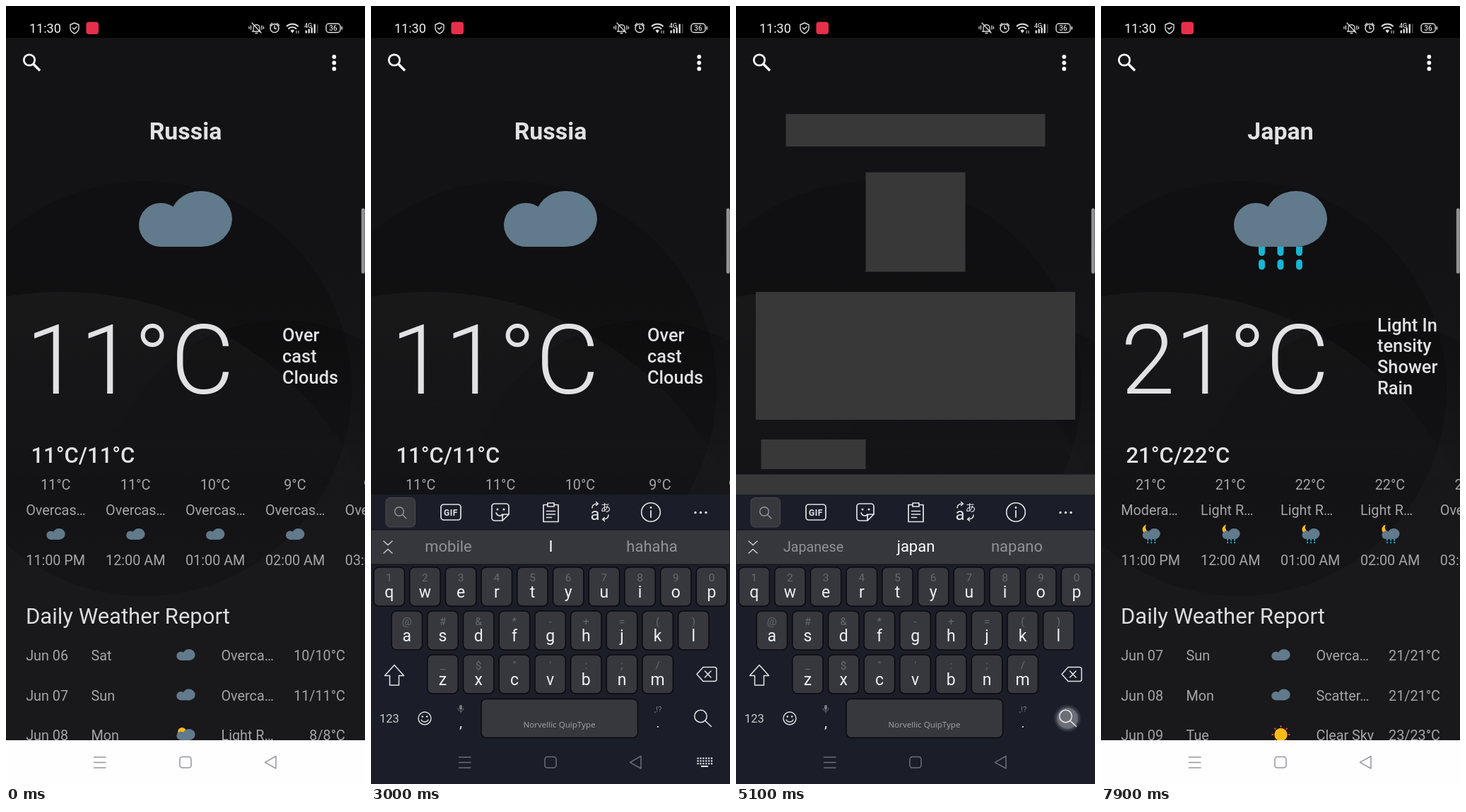
Write an HTML page that moves like this. It is 508x1102 px and loops after 8000 ms.

```html
<!DOCTYPE html>
<html lang="en">
<head>
<meta charset="utf-8">
<title>Weather search</title>
<style>
html, body { margin: 0; width: 100%; height: 100%; overflow: hidden; background: #131214; }
svg { display: block; width: 508px; height: 1102px; font-family: Roboto, sans-serif; }
.line { fill: none; stroke-linecap: round; stroke-linejoin: round; }
</style>
</head>
<body>
<svg id="stage" viewBox="0 0 508 1102" xmlns="http://www.w3.org/2000/svg"></svg>
<script>
const LOOP = 8000, STEP = 100;
const SLATE = '#617a8c', CYAN = '#16b6d4', AMBER = '#fdbb17';
const WHITE = '#e2e1e3', GREY = '#a5a4a7', KEY = '#37373e', BOARD = '#1b1e28';

// ---- markup helpers ----
const text = (x, y, size, fill, str, more = '') =>
  `<text x="${x}" y="${y}" font-size="${size}" fill="${fill}" ${more}>${str}</text>`;
const mid = (x, y, size, fill, str, more = '') =>
  text(x, y, size, fill, str, 'text-anchor="middle" ' + more);
const rect = (x, y, w, h, fill, r = 0, more = '') =>
  `<rect x="${x}" y="${y}" width="${w}" height="${h}" rx="${r}" fill="${fill}" ${more}/>`;
const dot = (x, y, r, fill, more = '') =>
  `<circle cx="${x}" cy="${y}" r="${r}" fill="${fill}" ${more}/>`;
const line = (d, stroke, w) =>
  `<path class="line" d="${d}" stroke="${stroke}" stroke-width="${w}"/>`;
const group = (id, body, more = '') => `<g id="${id}" ${more}>${body}</g>`;
const place = (x, y, s, body) => `<g transform="translate(${x} ${y}) scale(${s})">${body}</g>`;

// ---- weather icons, drawn around 0,0 at full size ----
const cloud = dot(-35, 8.5, 31, SLATE) + rect(-35, 8.5, 57, 31, SLATE) +
  `<ellipse cx="22" rx="44" ry="39.5" fill="${SLATE}"/>`;
const drops = [-26.5, 0, 26.5].map(x =>
  `<path d="M${x - 4.5} 39h9v9a4.5 4.5 0 0 1-9 0z" fill="${CYAN}"/>` +
  rect(x - 4.5, 57.5, 9, 14.5, CYAN, 4.5)).join('');
const rays = [...Array(8)].map((_, i) =>
  `<path d="M0-52V-64" stroke="#ef5030" stroke-width="9" transform="rotate(${i * 45})"/>`).join('');
const icons = {
  cloud,
  rain: drops + cloud,
  sunCloud: dot(-27, -20, 30, AMBER) + cloud,
  moonRain: place(0, -8, 1,
    `<path d="M-32-58A34 34 0 1 0 2-4A36 36 0 0 1-32-58z" fill="${AMBER}"/>` +
    place(4, 6, 0.95, drops + cloud)),
  sun: rays + dot(0, 0, 46, AMBER)
};

// ---- app content ----
function weather(id, w) {
  const hours = w.hours.map(([temp, sky], i) => {
    const x = 28.2 + 112.9 * i, c = x + 42;
    const time = ['11:00 PM', '12:00 AM', '01:00 AM', '02:00 AM', '03:00 AM'][i];
    return mid(c, 685, 19.8, GREY, temp + '°C') + text(x, 720.5, 19.8, GREY, sky) +
      text(x, 792, 19.8, GREY, time);
  }).join('');
  const days = w.days.map(([date, day, , sky, range], i) => {
    const y = 927 + 56.5 * i;
    return text(28.2, y, 19.8, GREY, date) + text(120.5, y, 19.8, GREY, day) +
      text(304.5, y, 19.8, GREY, sky) + text(480, y, 19.8, GREY, range + '°C', 'text-anchor="end"');
  }).join('');
  const skyTop = 505 - (w.sky.length - 1) * 14.8;
  const art = place(254, 301.5, 1, icons[w.icon]) +
    w.hours.map((_, i) => place(70.5 + 112.9 * i, 748, 0.2, icons[w.hourIcon])).join('') +
    w.days.map((d, i) => place(254.5, 919 + 56.5 * i, 0.2, icons[d[2]])).join('');
  return group(id,
    mid(254, 189, 33.9, WHITE, w.city, 'font-weight="700"') +
    text(28, 549, 138, WHITE, w.now, 'font-weight="300"') +
    w.sky.map((s, i) => text(391, skyTop + i * 29.7, 25.4, WHITE, s, 'font-weight="500"')).join('') +
    text(35.5, 647, 31, WHITE, w.range, 'font-weight="500"') +
    hours + text(28, 874.5, 31, '#dcdbdd', 'Daily Weather Report') + days +
    group(id + 'Art', art), 'clip-path="url(#page)"');
}

const first = weather('first', {
  city: 'Russia', icon: 'cloud', now: '11°C', range: '11°C/11°C', hourIcon: 'cloud',
  sky: ['Over', 'cast', 'Clouds'],
  hours: [11, 11, 10, 9, 9].map(t => [t, 'Overcas…']),
  days: [['Jun 06', 'Sat', 'cloud', 'Overca…', '10/10'],
         ['Jun 07', 'Sun', 'cloud', 'Overca…', '11/11'],
         ['Jun 08', 'Mon', 'sunCloud', 'Light R…', '8/8']]
});
const second = weather('second', {
  city: 'Japan', icon: 'rain', now: '21°C', range: '21°C/22°C', hourIcon: 'moonRain',
  sky: ['Light In', 'tensity', 'Shower', 'Rain'],
  hours: [[21, 'Modera…'], [21, 'Light R…'], [22, 'Light R…'], [22, 'Light R…'], [22, 'Overcas…']],
  days: [['Jun 07', 'Sun', 'cloud', 'Overca…', '21/21'],
         ['Jun 08', 'Mon', 'cloud', 'Scatter…', '21/21'],
         ['Jun 09', 'Tue', 'sun', 'Clear Sky', '23/23']]
});
const skeleton = group('skeleton', [
  [70.5, 153, 367, 46], [183.5, 235.5, 141, 141], [28, 405, 452, 181], [35.5, 614, 148, 42],
  [0, 663.5, 508, 141.5], [28, 841.5, 289.5, 41.5], [28, 891.5, 452, 149]
].map(r => rect(...r, '#393839')).join(''));

const defs = `<defs>
  <clipPath id="page"><rect y="45" width="508" height="995"/></clipPath>
  <linearGradient id="base" x2="0" y2="1"><stop offset=".3" stop-color="#131214"/><stop offset=".75" stop-color="#19181b"/></linearGradient>
  <linearGradient id="hill" x2="0" y2="1"><stop stop-color="#fff" stop-opacity=".035"/><stop offset=".3" stop-color="#fff" stop-opacity="0"/></linearGradient>
  <linearGradient id="dusk" x2="0" y2="1"><stop stop-color="#000" stop-opacity=".2"/><stop offset=".4" stop-color="#000" stop-opacity="0"/></linearGradient>
  <radialGradient id="glow"><stop offset=".7" stop-color="#f2f2f6"/><stop offset=".78" stop-color="#c8cede" stop-opacity=".55"/><stop offset="1" stop-color="#c8cede" stop-opacity="0"/></radialGradient>
</defs>`;
const backdrop = rect(0, 0, 508, 1102, 'url(#base)') + dot(195, 542, 294, '#000', 'opacity=".17"') +
  dot(390, 690, 245, 'url(#dusk)') + dot(80, 874, 469, 'url(#hill)');

// ---- status bar and header ----
const S = '#dedede';
const statusBar = rect(0, 0, 508, 45, '#000') + text(33, 37.5, 18, '#f2f2f2', '11:30') +
  line('M97 24l6 2.5v5c0 4-3 6-6 7.5c-3-1.5-6-3.5-6-7.5v-5zM94.5 31l2 2 3.5-3.5', S, 1.4) +
  rect(113.5, 22.5, 17.5, 17.5, '#e6304b', 4) +
  line('M348.5 36h11.5M350 36v-5a4.5 4.5 0 0 1 9 0v5M353 38.5h3M348 24l13 14M346.5 28v5M344 29.5v2.5M362 28v5M364.5 29.5v2.5', S, 1.3) +
  dot(380, 31.5, 6, 'none', `stroke="${S}" stroke-width="1.5"`) +
  line('M380 28v4h2.5M373.5 27.5l3-3M386.5 27.5l-3-3', S, 1.4) +
  line('M397.5 28.5a11.5 11.5 0 0 1 15.5 0M400 32a7.5 7.5 0 0 1 10.5 0', S, 1.9) +
  `<path d="M402.5 34.8a4 4 0 0 1 5.5 0L405.2 38.5z" fill="${S}"/>` +
  line('M411 35v3.5M414 35v3.5', S, 1) +
  text(422, 31, 9, S, '4G', 'font-weight="500"') +
  [[423.5, 4], [427.5, 6], [431.5, 8], [435.5, 13]].map(([x, h]) => rect(x, 38.5 - h, 2.4, h, S)).join('') +
  rect(440, 25.5, 1.6, 13, '#444') +
  rect(453, 25, 20, 12.5, 'none', 4, `stroke="${S}" stroke-width="1.4"`) +
  rect(474.5, 29, 1.6, 4.5, S) + mid(463, 35, 10, S, '36', 'font-weight="500"');
const header = dot(33, 76.5, 7.7, 'none', 'stroke="#f6f6f6" stroke-width="2.8"') +
  `<path d="M38.5 82L48 91.5" stroke="#f6f6f6" stroke-width="3.6"/>` +
  [72, 80.5, 89].map(y => dot(464.3, y, 2.9, '#f6f6f6')).join('');
const field = group('clear', line('M379.5 71.5l15 15M394.5 71.5l-15 15', '#030303', 2)) +
  text(105, 88, 25.4, '#ececee', '', 'id="typed"') +
  rect(105, 91, 0, 1.6, '#dcdcde', 0, 'id="under"') + rect(105.3, 61.5, 2.4, 34, '#fff', 0, 'id="cursor"');

// ---- keyboard ----
const rows = [
  { keys: 'qwertyuiop', hints: '1234567890', x: 25.7, y: 795 },
  { keys: 'asdfghjkl', hints: '@#&*-+=()', x: 50.8, y: 857 },
  { keys: 'zxcvbnm', hints: '_$"\':;/', x: 101.5, y: 919 }
];
const spot = {};
const esc = c => c === '&' ? '&amp;' : c;
const cap = (x, y, w, h) => rect(x, y, w, h, KEY, 7, 'stroke="#0a0a0e" stroke-width="1.5"');
const keys = rows.map(r => [...r.keys].map((k, i) => {
  const x = r.x + 50.7 * i;
  spot[k] = [x, r.y];
  return cap(x - 21.7, r.y, 43.4, 55) + mid(x, r.y + 20, 15.5, '#68686e', esc(r.hints[i])) +
    mid(x, r.y + 43, 23, '#f0f0f3', k);
}).join('')).join('');

const I = '#e4e4e8';
const toolbar = rect(21, 696.5, 41.5, 41.5, KEY, 6, 'stroke="#4a4a50"') +
  dot(40, 716, 6.3, 'none', 'stroke="#97979c" stroke-width="1.4"') + line('M44.8 720.8l5 5', '#97979c', 1.4) +
  rect(99, 706, 28, 22, 'none', 4, `stroke="${I}" stroke-width="1.7"`) +
  mid(113, 721.5, 12, I, 'GIF', 'font-weight="700" letter-spacing=".6"') +
  line('M175 705h16a4 4 0 0 1 4 4v11l-9 9h-11a4 4 0 0 1-4-4v-16a4 4 0 0 1 4-4zM195 720h-6a3 3 0 0 0-3 3v6M177 718c2 5 7 5 9 2', I, 1.7) +
  dot(179, 713, 1.5, I) + dot(188, 713, 1.5, I) +
  line('M250 706.5h-6v24h21v-24h-6M250 704h9v5h-9zM248.5 715.5h12M248.5 720h12M248.5 724.5h7', I, 1.7) +
  mid(317, 728, 24, I, 'a') + mid(332, 716, 15, I, 'あ', 'font-family="Noto Sans CJK JP, sans-serif"') +
  line('M313 711c0-4 3-6 8-6M318.5 702.5l3 2.5-3 2.5M336 721c0 4-3 6-8 6M330.500 724.500l-3 2.500 3 2.500', I, 1.5) +
  dot(396, 717, 13.3, 'none', `stroke="${I}" stroke-width="1.6"`) + line('M396 715v9', I, 1.8) + dot(396, 710.5, 1.4, I) +
  [459, 466.5, 474].map(x => dot(x, 717.5, 1.7, I)).join('');
const strip = rect(0, 742, 508, 49, '#36363d', 0, 'stroke="#101116"') +
  line('M18 758l6 5.500 6-5.500M18 775l6-5.500 6 5.500', '#c9c9ce', 1.5) +
  mid(109.500, 773, 22, '#919197', '', 'id="left"') + mid(254.500, 773, 22, '#fff', '', 'id="centre"') +
  mid(397.500, 773, 22, '#919197', '', 'id="right"');
const bottomRow = cap(156, 981.5, 221.5, 55) +
  mid(266.5, 1021.5, 11.6, '#a4a4aa', 'Norvellic QuipType', 'font-family="Open Sans, sans-serif"') +
  text(12, 1015, 16.5, '#c9c9ce', '123') +
  dot(76, 1009, 9, 'none', `stroke="${I}" stroke-width="1.4"`) +
  dot(72.8, 1006.5, 1.3, I) + dot(79.2, 1006.5, 1.3, I) + line('M71 1011c2 4 8 4 10 0', I, 1.3) +
  rect(125, 990, 4, 7, '#77777d', 2) + line('M123 995c0 5 8 5 8 0M127 999v2', '#77777d', 1) +
  mid(127, 1022, 21, I, ',') + mid(406, 1000, 11.5, '#77777d', ',!?') + mid(406, 1022, 19, I, '.') +
  dot(466.5, 1006, 8.7, 'none', `stroke="${I}" stroke-width="1.5"`) + line('M473 1012.500l8.500 8', I, 1.5) +
  line('M33 933.500l13.500 15h-7v13.500h-13v-13.500h-7z', I, 1.5) +
  line('M470 936.500h16a3 3 0 0 1 3 3v14a3 3 0 0 1-3 3h-16l-9-10zM472.500 942l8.500 9M481 942l-8.500 9', I, 1.5);
const popup = group('popup', rect(-24.5, -65, 49, 124, KEY, 7, 'stroke="#0a0a0e" stroke-width="1.5"') +
  mid(0, -22, 34, '#fff', '', 'id="popKey"'));
const board = group('board', rect(0, 692, 508, 410, BOARD) + toolbar + strip + keys + bottomRow + popup);

const navIcons = group('nav', line('M124.500 1064h16.500M124.500 1071.500h16.500M124.500 1079h16.500', 'currentColor', 1.5) +
  rect(246, 1063.500, 16, 15.500, 'none', 3.5, 'stroke="currentColor" stroke-width="1.5"') +
  line('M382 1062.500v17.500l-15.500-8.700z', 'currentColor', 1.5));
const pad = group('pad', [0, 1, 2].map(r => [...Array(6)].map((_, i) =>
  rect(461.5 + i * 3.9, 1064.5 + r * 3.8, 2.2, 2.2, 'currentColor')).join('')).join('') +
  rect(467, 1076, 10, 2, 'currentColor'));

const stage = document.getElementById('stage');
stage.innerHTML = defs + backdrop + first + second + skeleton + statusBar + header + field +
  rect(502.8, 286.5, 5, 92.5, '#929193', 2.5) + rect(0, 1040, 508, 62, '#fefdff') +
  board + navIcons + pad + dot(0, 0, 20, 'url(#glow)', 'id="touch"');

// ---- timeline: [from ms, values...] ----
const boardSteps = [[0, 0, 0], [2600, 105, 0.5], [2700, 45, 0.8], [2800, 14, 0.95], [2900, 2, 1], [3000, 0, 1],
  [5200, 80, 0.5], [5300, 0, 0]];
const touchSteps = [[0, 0, 0, 0], [2500, 35.5, 81, 0.5], [2600, 35.5, 81, 0.42], [2700, 35.5, 81, 0.15], [2800, 0, 0, 0],
  [3700, 357, 900, 0.7], [3800, 357, 900, 0.35], [3900, 52, 902, 0.7], [4000, 483, 840, 0.7],
  [4100, 483, 840, 0.35], [4200, 52, 901, 0.7], [4300, 52, 901, 0.35], [4400, 358, 964, 0.76],
  [4500, 358, 964, 0.5], [4600, 358, 964, 0.2], [4700, 0, 0, 0],
  [5000, 469, 1009, 0.6], [5100, 469, 1009, 0.38], [5200, 469, 1009, 0.12], [5300, 0, 0, 0]];
const popSteps = [[0, ''], [3700, 'j'], [3900, 'a'], [4000, 'p'], [4200, 'a'], [4400, 'n'], [4600, '']];
const typedSteps = [[0, ''], [3800, 'j'], [4000, 'ja'], [4100, 'jap'], [4300, 'japa'], [4500, 'japan'], [5100, '']];
const cursorSteps = [[0, 0], [2500, 1], [3000, 0], [3500, 1], [5100, 0]];
const wordSteps = [[0, 'mobile', 'I', 'hahaha'], [3800, 'just', 'j', 'join'], [4000, 'jam', 'ja', 'jar'],
  [4100, 'Japan', 'jap', 'nap'], [4300, 'Japanese', 'japan', 'kapa'], [4700, 'Japanese', 'japan', 'napano']];
const sceneSteps = [[0, 'first'], [5100, 'skeleton'], [6600, 'second']];

const at = (steps, t) => steps.filter(s => s[0] <= t).pop().slice(1);
const $ = id => document.getElementById(id);
const set = (id, attrs) => { for (const k in attrs) $(id).setAttribute(k, attrs[k]); };
const show = (id, on) => { $(id).style.display = on ? '' : 'none'; };

function draw(t) {
  const [scene] = at(sceneSteps, t);
  ['first', 'skeleton', 'second'].forEach(id => show(id, id === scene));
  set('secondArt', { opacity: Math.min(1, Math.max(0, (t - 6500) / 500)) });

  const [drop, alpha] = at(boardSteps, t);
  show('board', alpha > 0);
  set('board', { transform: `translate(0 ${drop})`, opacity: alpha });
  $('nav').style.color = alpha > 0.6 ? '#6d6e74' : alpha > 0 ? '#55555b' : '#97979a';
  show('pad', alpha > 0 && t < 5100);
  $('pad').style.color = alpha > 0.6 ? '#e4e4e8' : '#0c0c0e';

  const [key] = at(popSteps, t);
  show('popup', key);
  if (key) {
    set('popup', { transform: `translate(${spot[key]})` });
    $('popKey').textContent = key;
  }

  const [typed] = at(typedSteps, t);
  $('typed').textContent = typed;
  const width = typed ? $('typed').getComputedTextLength() : 0;
  set('under', { width });
  set('cursor', { x: 105.3 + Math.max(0, width - 1) });
  show('cursor', at(cursorSteps, t)[0]);
  show('clear', typed);

  const words = at(wordSteps, t);
  ['left', 'centre', 'right'].forEach((id, i) => {
    $(id).textContent = words[i];
    set(id, { 'font-size': words[i].length > 7 ? 19.7 : 22 });
  });

  const [cx, cy, opacity] = at(touchSteps, t);
  set('touch', { cx, cy, opacity });
}

const start = performance.now();
function tick() {
  const t = (performance.now() - start) % LOOP;
  draw(Math.floor(t / STEP) * STEP);
  requestAnimationFrame(tick);
}
tick();
</script>
</body>
</html>
```
